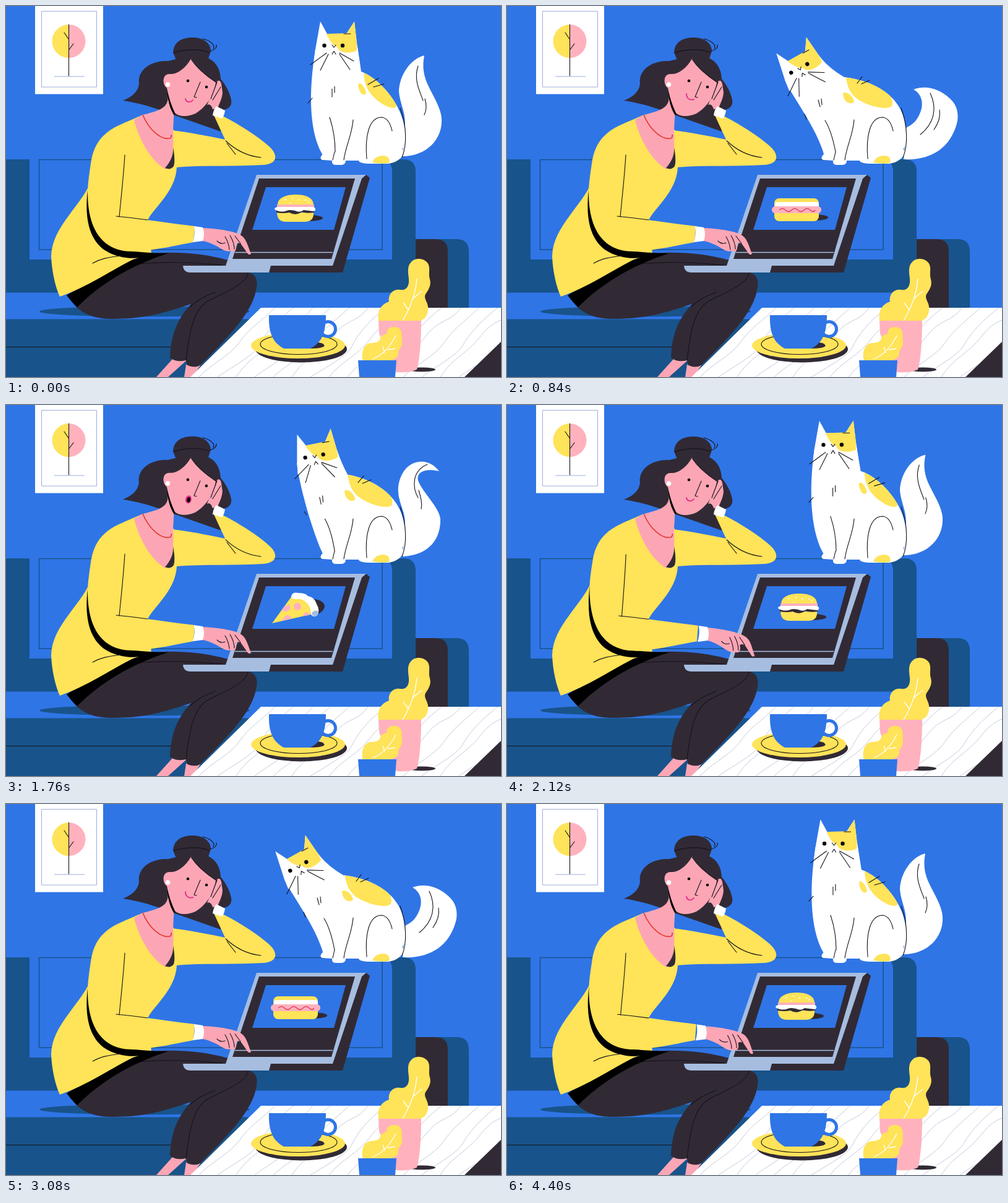
These frames come from a looping animation (800x600 px, 4480 ms). An HTML page:

```html
<!DOCTYPE html>
<html lang="en">
<head>
<meta charset="utf-8">
<title>Choosing dinner</title>
<style>
html, body { margin: 0; width: 100%; height: 100%; overflow: hidden; background: #2f75e6; }
svg { display: block; width: 100vw; height: 100vh; }
.navy { fill: #18538b; } .blue { fill: #2f75e6; } .yellow { fill: #ffe358; }
.skin { fill: #fca6b5; } .pink { fill: #ffb1be; } .dark { fill: #312a35; }
.white { fill: #fff; } .steel { fill: #a6bde0; }
.ink { fill: none; stroke: #16121a; stroke-width: 1.1; stroke-linecap: round; stroke-linejoin: round; }
</style>
</head>
<body>
<svg viewBox="0 0 800 600" preserveAspectRatio="none">
  <defs>
    <clipPath id="screenClip"><path d="M420,293 H549 L530,362 H398 Z"/></clipPath>
    <clipPath id="tableClip"><path d="M412,488 H800 V543 L741,600 H298 Z"/></clipPath>
    <clipPath id="bodyClip"><path id="bodyClipPath"/></clipPath>
  </defs>
  <rect class="blue" width="800" height="600"/>

  <g id="picture">
    <path class="white" d="M47,0 H157 V142.500 H47 Z"/>
    <path d="M57.500,8.500 H146.500 V131 H57.500 Z M78,114 H127" fill="none" stroke="#9aaedb"/>
    <path class="yellow" d="M101.500,30 A27,27 0 0 0 101.500,84 Z"/>
    <path class="pink" d="M101.500,30 A27,27 0 0 1 101.500,84 Z"/>
    <path class="ink" d="M101.500,30 V113 M94,43 L101.500,54 M109,61 L101.500,71"/>
  </g>

  <g id="sofa">
    <path class="navy" d="M700,377 H728 Q748,377 748,397 V488 H690 Z"/>
    <path class="dark" d="M662,377 H694 Q714,377 714,397 V488 H662 Z"/>
    <path class="navy" d="M0,248 H642 Q662,248 662,268 V464 H0 Z"/>
    <path class="blue" d="M38,247 H604 Q624,248 624,268 V410 H38 Z"/>
    <path d="M53.500,248.500 H608 V394 H53.500 Z" fill="none" stroke="#18538b" stroke-width="1.500"/>
    <path class="blue" d="M0,463.500 H662 V507 H0 Z"/>
    <path class="navy" d="M0,506.500 H662 V600 H0 Z"/>
    <path class="ink" d="M0,551.500 H275"/>
    <ellipse class="navy" cx="224" cy="494" rx="170" ry="8.500"/>
  </g>

  <g id="cat">
    <path id="tail" class="white"/>
    <path id="tailLines" class="ink"/>
    <path id="body" class="white"/>
    <path class="white" d="M514,238 C506,244 508,249 512,249 L527,250 Q526,257 533,257 H543 Q549,256 549,250 H570 Q571,255 590,255 H618 Q638,252 645,235 L630,225 Z"/>
    <g id="head">
      <path class="white" d="M508,25 L519,45 H550 L563,25 L567,60 L572,95 L540,130 L498,88 L500,70 Z"/>
      <path class="yellow" d="M563,25 L551,44 L518,45 C522,55 529,65 535,66 C537,76 555,78 567,72 L567,60 Z"/>
      <circle cx="514.500" cy="64" r="3.200"/><circle cx="544" cy="64" r="3.200"/>
      <path class="ink" d="M527,63 L530,67 L533,63 M527,78 L530,73 L533,78 M546,45 H557 M518,76 L492,95 M521,78 L508,104 M539,76 L562,89 M539,78 L556,103"/>
    </g>
    <g clip-path="url(#bodyClip)">
      <path id="patch" class="yellow"/>
      <path id="spot" class="yellow"/>
    </g>
    <path class="yellow" d="M592,253 Q596,242 611,242 Q622,244 619,254 Q605,256 592,253 Z"/>
    <path id="furLines" class="ink"/>
    <path class="ink" d="M561,184 C559,210 549,225 546,249 M528,249 L531,236 M583,247 C580,212 586,181 606,180 C615,180 621,189 624,202 M637,165 C648,195 648,225 640,245"/>
  </g>

  <g id="woman">
    <g class="bob">
      <path class="dark" d="M300,80 C325,78 346,90 347,118 C355,128 362,140 364,152 C366,162 358,168 350,168 L347,203 L270,176 C240,164 215,157 189,153 C203,147 213,140 215,126 C212,105 232,88 262,89 Z"/>
      <path class="dark" d="M276,90 L270,75 C271,58 284,51 302,51 C320,51 331,61 331,73 L326,88 Z"/>
      <path class="ink" d="M271,76 C288,69 314,69 328,75 M318,53 C330,56 339,63 335,69 M330,73 C338,71 341,67 340,63"/>
    </g>
    <path class="skin" d="M270,570 L292,573 L262,600 H243 Z M291,580 L314,581 L302,600 H288 Z"/>
    <path class="dark" d="M225,401 C270,396 320,400 358,411 L385,430 C402,431 409,440 404,460 C398,495 360,535 316,579 Q308,587 293,581 L291,573 Q276,577 265,569 C266,535 275,508 299,482 C250,498 225,506 170,506 C132,506 110,490 100,466 Z"/>
    <path class="ink" d="M391,432 C388,452 345,466 325,478 C302,492 296,530 291,573 M338,463 C322,469 308,476 298,486 M212,417 C260,413 310,415 350,419" stroke="#000"/>
    <path d="M98,468 C150,440 190,412 232,401 L262,400 C200,420 152,450 115,487 Q105,478 98,468 Z"/>
    <path id="sleeve" class="yellow"/>
    <path id="sleeveLines" class="ink"/>
    <path class="yellow" d="M221,176 C195,188 168,196 152,220 C144,235 142,255 140,277 C125,322 74,355 73,405 C74,430 80,455 87,470 C130,455 175,425 205,410 L235,401 L229,346 C240,325 274,300 276,261 L271,200 Z"/>
    <path class="skin" d="M258,125 C266,158 264,166 221,176 L207,184 C214,215 235,252 258,264 C266,258 272,240 270,200 L272,165 Z"/>
    <path class="dark" d="M270,228 C271,245 263,255 257,262 Q266,266 271,259 Q274,250 270,228 Z"/>
    <path d="M221,176 C231,200 250,217 265,214 Q268,212 267,208" fill="none" stroke="#e8392f" stroke-width="1.700"/>
    <g class="bob">
      <path d="M260,132 C261,152 265,167 272,177 L276,165 Z"/>
      <path class="skin" d="M334,167 Q331,157 325,160 L330,148 C336,139 340,128 341,122 Q346,118 348,126 L350,140 C349,152 344,158 342,166 Z"/>
      <path class="white" d="M340,162 L354,169 Q353,177 349,182 L334,177 Q335,168 340,162 Z"/>
      <path class="skin" d="M299,85 C309,101 322,112 339,123 C338,140 325,163 306,174 C292,180 280,179 273,173 C267,160 262,145 260,132 C253,129 251,109 265,110 C275,111 290,102 299,85 Z"/>
      <path class="ink" d="M299,86 C309,101 322,112 339,123 M341,123 L331,150 M347,131 L334,152 M314,123 L304,147 L308,148"/>
      <circle class="white" cx="261.500" cy="127" r="3.800"/>
      <circle cx="294" cy="121" r="2.300"/><circle cx="324" cy="131" r="2.300"/>
      <path id="smile" fill="none" stroke="#e62f8b" stroke-width="1.900" stroke-linecap="round"/>
      <g id="gasp" transform="rotate(12 295 153)">
        <ellipse cx="295" cy="153" rx="5" ry="6.500" fill="#e62f8b"/>
        <ellipse cx="295.500" cy="153.500" rx="2.800" ry="4.300"/>
      </g>
    </g>
  </g>

  <g id="laptop">
    <path class="dark" d="M573,280 L582,273 L588,278 L544,431 H424 L426,419 H520 Z"/>
    <path class="steel" d="M405,273 H582 L575,279 L528,420 H428 L425,431 H298 Q287,431 286,420 H355 Z"/>
    <path class="dark" d="M409,279 H564 L526,409 H366 Z"/>
    <path class="blue" d="M420,293 H549 L530,362 H398 Z"/>
    <path d="M370,398.500 H528" stroke="#a6bde0" stroke-width="1.300"/>
    <g clip-path="url(#screenClip)">
      <g id="burger">
        <ellipse class="dark" cx="490" cy="343" rx="22" ry="5"/>
        <path class="yellow" d="M438,334 H497 Q498,348 484,349 H451 Q438,348 438,334 Z M439,322 C439,309 454,305 468,305 C483,305 497,309 497,322 Z"/>
        <path class="dark" d="M437,329 H498 V334 Q485,336 478,333 Q468,340 458,334 Q448,336 437,334 Z"/>
        <path class="pink" d="M438,321 H498 V326 H438 Z"/>
        <path class="white" d="M438,325 H497 Q503,328 498,332 Q488,331 481,330 Q475,335 467,331 Q458,329 454,331 Q446,334 438,331 Q430,328 438,325 Z"/>
        <path d="M450,314 l3,-2 M458,318 l3,1 M462,310 l2,2 M472,315 l2,-3 M483,313 l2,2 M488,318 l1,-3" stroke="#fff" stroke-width="1.300"/>
      </g>
      <g id="hotdog">
        <ellipse class="dark" cx="502" cy="342" rx="17" ry="4.500"/>
        <rect class="yellow" x="432" y="311" width="72" height="37" rx="8"/>
        <rect class="white" x="433" y="317" width="71" height="10" rx="4"/>
        <rect class="pink" x="428" y="324" width="80" height="11" rx="5.500"/>
        <path d="M440,330 q5,-5 10,0 t10,0 t10,0 t10,0 t10,0 t8,0" fill="none" stroke="#e0405f" stroke-width="1.500"/>
      </g>
      <g id="pizza">
        <path class="dark" d="M494,314 C506,313 515,319 515,326 Q513,335 503,338 Z"/>
        <path class="yellow" d="M430,353 L462,309 L490,315 L500,337 Z"/>
        <g class="pink"><circle cx="471" cy="326" r="6"/><path d="M450,326 L458,322 Q462,332 453,334 Q448,334 446,331 Z M449,344 Q452,338 459,341 L462,345 L446,349 Z M480,341 Q482,333 490,336 L490,340 Z"/></g>
        <path class="white" d="M461,309 Q463,302 473,304 Q484,304 488,309 Q499,311 502,322 Q508,332 503,340 Q497,345 493,339 Q493,325 484,318 Q476,312 468,314 Q461,314 461,309 Z"/>
        <path class="steel" d="M494,337 Q497,331 504,333 Q506,338 502,341 Q496,344 494,337 Z"/>
      </g>
    </g>
  </g>

  <path id="armShade"/>
  <path class="ink" d="M140,416 C152,409 165,406 188,404"/>
  <path id="arm" class="yellow"/>
  <path id="armLine" class="ink"/>
  <g id="wrist">
    <g id="hand">
      <path class="skin" d="M318,359 C345,360 372,365 380,371 C389,377 391,389 396,401 Q392,404 389,398 L379,384 Q373,382 371,385 C374,394 370,399 364,396 C357,399 348,393 342,389 C334,385 326,381 317,380 Z"/>
      <path class="ink" d="M341,380 Q347,386 354,383 M354,373 Q360,383 361,394 M362,371 Q369,383 369,393 M370,372 L379,384"/>
    </g>
    <path class="white" d="M304,356 L318,358 Q322,369 318,380 L302,382 Q306,369 304,356 Z"/>
  </g>

  <g id="table">
    <path class="white" d="M412,488 H800 V600 H298 Z"/>
    <path class="dark" d="M800,543 V600 H741 Z"/>
    <path id="grain" clip-path="url(#tableClip)" fill="none" stroke="#c5cbdd"/>
    <ellipse class="dark" cx="477" cy="555" rx="74" ry="21.500"/>
    <ellipse class="yellow" cx="472" cy="549" rx="76" ry="21"/>
    <ellipse class="ink" cx="473" cy="547" rx="62" ry="16.500"/>
    <path class="dark" d="M470,553 Q490,538 512,546 Q522,553 492,554 Z"/>
    <circle cx="520.500" cy="522.500" r="12" fill="none" stroke="#2f75e6" stroke-width="5"/>
    <path class="blue" d="M425,500 H517 C517,535 506,546 492,554 H449 C432,545 424,530 425,500 Z"/>
    <ellipse class="dark" cx="672" cy="588" rx="22" ry="3.500"/>
    <path class="yellow" d="M602,510 C600,492 606,483 619,478 C617,466 626,457 637,459 C645,460 650,456 651,447 C652,440 648,430 651,420 C656,407 672,405 681,415 C687,423 682,432 685,442 C688,452 682,460 678,466 C674,474 684,480 682,492 C681,502 676,507 668,510 Z"/>
    <path d="M641,509 C653,489 662,466 664,441 M658,473 L672,461 M650,491 L642,480" fill="none" stroke="#fff" stroke-width="1.400"/>
    <path class="pink" d="M602,509 H671 C671,545 668,575 664,588 Q650,594 630,592 L603,530 Z"/>
    <path class="yellow" d="M577,574 C573,560 578,546 590,545 C598,545 604,543 605,537 C607,531 612,532 616,529 C613,521 625,517 633,520 C642,524 639,535 640,543 C641,553 633,555 634,562 C634,571 622,574 610,574 Z"/>
    <path d="M592,571 C608,565 621,551 630,533 M612,561 L609,551 M617,556 L629,554" fill="none" stroke="#fff" stroke-width="1.300"/>
    <path class="blue" d="M569,573 H631 L629,600 H571 Z"/>
  </g>
</svg>
<script>
const PERIOD = 2240, STEP = 40;
const el = id => document.getElementById(id);
const put = (id, d) => el(id).setAttribute('d', d);
const move = (node, value) => node.setAttribute('transform', value);
const mix = (a, b, k) => a + (b - a) * k;
const smooth = k => k * k * (3 - 2 * k);
const NUMBER = /-?\d+(\.\d+)?/g;

// Monotone cubic through keyed values.
function sample(times, values, t) {
  let i = 0;
  while (i < times.length - 2 && t > times[i + 1]) i++;
  const slope = j => (values[j + 1] - values[j]) / (times[j + 1] - times[j]);
  const tangent = j => {
    if (j < 1 || j > times.length - 2) return 0;
    const a = slope(j - 1), b = slope(j);
    return a * b <= 0 ? 0 : 2 * a * b / (a + b);
  };
  const h = times[i + 1] - times[i], k = (t - times[i]) / h;
  return mix(values[i], values[i + 1], smooth(k))
    + h * k * (1 - k) * (tangent(i) * (1 - k) - tangent(i + 1) * k);
}

function morph(times, paths) {
  const rows = paths.map(p => p.match(NUMBER).map(Number));
  return t => {
    let n = 0;
    return paths[0].replace(NUMBER, () => {
      const c = n++;
      return sample(times, rows.map(r => r[c]), t).toFixed(2);
    });
  };
}
const blend = (a, b) => morph([0, 1], [a, b]);

const sitting = 'M641,243 C680,243 706,215 704,182 C703,165 690,145 682,128 C676,115 672,100 676,80 C655,85 636,110 635,138 C636,155 645,170 645,190';
const sittingLines = 'M666,97 C658,120 670,140 674,153 M677,150 C680,160 680,168 676,176';
const tailTimes = [0, 80, 320, 840, 1080, 1520, 1760, 2160, 2240];
const tailShape = morph(tailTimes, [
  sitting, sitting,
  'M641,243 C680,243 704,215 702,184 C700,165 685,150 674,134 C664,120 660,105 663,85 C645,92 627,112 627,136 C630,155 645,170 645,190',
  'M641,248 C685,250 716,230 727,190 C731,174 727,159 715,149 C700,135 678,127 657,135 C670,142 674,157 668,172 C662,187 655,192 645,197',
  'M641,248 C685,250 717,228 730,189 C735,172 732,156 722,146 C710,132 692,124 674,128 C680,136 676,152 666,168 C660,184 654,190 645,195',
  'M641,245 C680,246 702,222 697,190 C695,175 684,155 684,140 C686,122 712,124 718,113 C690,103 636,98 630,140 C631,158 645,170 645,190',
  'M641,245 C685,243 703,215 702,184 C700,165 672,140 666,122 C663,108 678,102 700,107 C680,80 640,88 634,132 C632,155 645,170 645,190',
  sitting, sitting
]);
const tailLines = morph(tailTimes, [
  sittingLines, sittingLines,
  'M656,97 C646,120 657,140 663,155 M668,152 C674,162 675,172 672,184',
  'M684,141 C696,166 690,190 668,208 M699,168 C701,180 697,190 690,200',
  'M690,138 C698,164 690,190 668,208 M701,165 C703,180 698,190 691,200',
  'M693,113 C672,113 657,135 655,159 M664,140 C661,147 660,150 660,157',
  'M681,96 C655,107 657,134 666,150 M667,138 C671,150 673,160 671,168',
  sittingLines, sittingLines
]);
const patch = blend(
  'M579,106 C605,108 640,150 631,163 C622,171 590,150 583,131 C578,118 578,112 579,106 Z',
  'M547,108 C585,110 630,140 622,162 C611,170 578,160 563,148 C555,140 549,132 547,108 Z');
const spot = blend(
  'M569,127 C572,121 580,131 582,140 C580,147 571,144 569,127 Z',
  'M543,141 C549,137 560,146 561,155 C555,161 543,155 543,141 Z');
const furLines = blend(
  'M527,134 L527,147 M531,130 L531,140 M585,127 L602,117 M594,131 L611,126 M488,157 L495,149 M523,180 C528,195 532,215 532,236',
  'M503,152 L506,163 M508,150 L509,160 M566,125 L574,114 M573,126 L586,120 M481,175 L484,183 M514,185 C522,198 527,215 531,236');

const arm = blend(
  'M202,185 C158,200 142,220 137,255 C134,275 132,290 132,302 C132,345 145,397 205,397 C240,396 280,386 303,382 L305,356 C280,353 250,349 229,346 L200,330 Z',
  'M202,185 C164,198 148,220 143,250 C141,260 140,268 140,277 C141,345 160,400 215,400 C250,399 295,388 325,384 L327,360 C295,356 260,351 229,349 L200,330 Z');
const armShade = blend(
  'M132,298 C127,340 133,375 158,394 C180,409 210,411 232,404 L262,400 C240,400 220,398 205,397 Z',
  'M140,275 C136,335 144,375 165,393 C185,409 205,413 230,407 L290,401 C260,400 230,400 215,400 Z');
const armLine = blend(
  'M192,241 C190,275 186,310 183,341 M178,340 C200,342 215,344 229,346',
  'M193,245 C195,280 196,315 197,346 M193,346 C208,347 220,348 229,349');
const sleeve = blend(
  'M268,201 C295,204 325,210 354,216 L336,177 Q344,168 352,179 C375,190 417,217 430,232 C441,246 434,256 415,257 C370,260 320,257 274,261 Z',
  'M268,201 C295,204 325,209 354,215 L334,173 Q342,164 350,175 C371,187 412,216 425,231 C436,245 429,255 410,256 C368,259 320,257 274,261 Z');
const sleeveLines = blend(
  'M355,218 C372,234 392,243 412,245 M357,222 L371,240',
  'M352,214 C370,233 388,242 408,244 M356,222 L370,240');
const smile = blend('M290,150 C291,156 298,157 302,152', 'M290,142 C290,150 296,153 302,151');

const headTimes = [0, 80, 320, 640, 1160, 1520, 1760, 2160, 2240];
const headX = [535.5, 535.5, 513.5, 459.5, 459.5, 479.5, 497.5, 534, 535.5];
const headY = [25, 25, 30, 63.5, 63.5, 53, 43, 25, 25];
const headTurn = [0, 0, -4, -28, -28, -19, -10, 0, 0];

function drawCat(t) {
  const x = sample(headTimes, headX, t), y = sample(headTimes, headY, t);
  const turn = sample(headTimes, headTurn, t), a = turn * Math.PI / 180;
  const onHead = (px, py) => {
    const dx = px - 535.5, dy = py - 25;
    return [x + dx * Math.cos(a) - dy * Math.sin(a), y + dx * Math.sin(a) + dy * Math.cos(a)];
  };
  const lean = (535.5 - x) / 76, early = 1 - (1 - lean) ** 2;
  const neck = [mix(574, 545, early), mix(106, 115, early)];
  const body = `M${onHead(500, 70)} C${onHead(497, 92)} ${mix(480, 502, lean)},${mix(190, 198, lean)} 513,243 `
    + `L530,250 H600 C635,250 645,235 645,207 C645,${mix(165, 150, early)} ${mix(606, 600, early)},${mix(118, 122, early)} ${neck} `
    + `Q${onHead(571, 85)} ${onHead(567, 60)} Z`;
  put('body', body);
  put('bodyClipPath', body);
  move(el('head'), `translate(${x} ${y}) rotate(${turn}) translate(-535.5 -25)`);
  put('patch', patch(early));
  put('spot', spot(early));
  put('furLines', furLines(early));
  put('tail', tailShape(t));
  put('tailLines', tailLines(t));
}

function drawWoman(t) {
  const swipe = sample([0, 80, 320, 360, 600, 860, 1080, 1120, 1360, 1760, 1920, 1960, 2160, 2240],
    [0, 0, 1, 1, 0, 0, 1, 1, 0, 0, 1, 1, 0.12, 0], t);
  const start = sample([0, 1200, 1480, 1560, 1800, 2240], [0, 0, 1, 1, 0, 0], t);
  put('arm', arm(swipe));
  put('armShade', armShade(swipe));
  put('armLine', armLine(swipe));
  move(el('wrist'), `translate(${22.5 * swipe} ${3.5 * swipe})`);
  move(el('hand'), `rotate(${11 * swipe} 319 369)`);
  document.querySelectorAll('.bob').forEach(g => move(g, `translate(${-2 * start} ${-4 * start})`));
  put('sleeve', sleeve(start));
  put('sleeveLines', sleeveLines(start));
  put('smile', smile(sample([0, 400, 720, 1160, 1280, 2240], [0, 0, 1, 1, 0, 0], t)));
  const gasping = t >= 1280 && t < 1960;
  el('smile').style.display = gasping ? 'none' : '';
  el('gasp').style.display = gasping ? '' : 'none';
}

function drawFood(t) {
  const page = sample([0, 340, 560, 1100, 1320, 1940, 2140, 2240], [0, 0, 1, 1, 2, 2, 3, 3], t);
  ['burger', 'hotdog', 'pizza'].forEach((id, i) => {
    const offset = (i - page + 4.5) % 3 - 1.5;
    move(el(id), `translate(${offset * 145} 0)`);
  });
}

function drawGrain() {
  let d = '';
  for (let i = 0; i < 17; i++) {
    const x = 312 + i * 30, w = 10 * Math.sin(i * 2.3);
    d += `M${x},600 C${x + 20},${578 + w} ${x + 50 + w},566 ${x + 66},${543 + w} S${x + 95 - w},515 ${x + 125},486 `;
  }
  put('grain', d);
}

function render(now) {
  const t = Math.floor(now / STEP) * STEP % PERIOD;
  drawCat(t);
  drawWoman(t);
  drawFood(t);
}

drawGrain();
const begin = performance.now();
function tick() {
  render(performance.now() - begin);
  requestAnimationFrame(tick);
}
tick();
</script>
</body>
</html>
```
